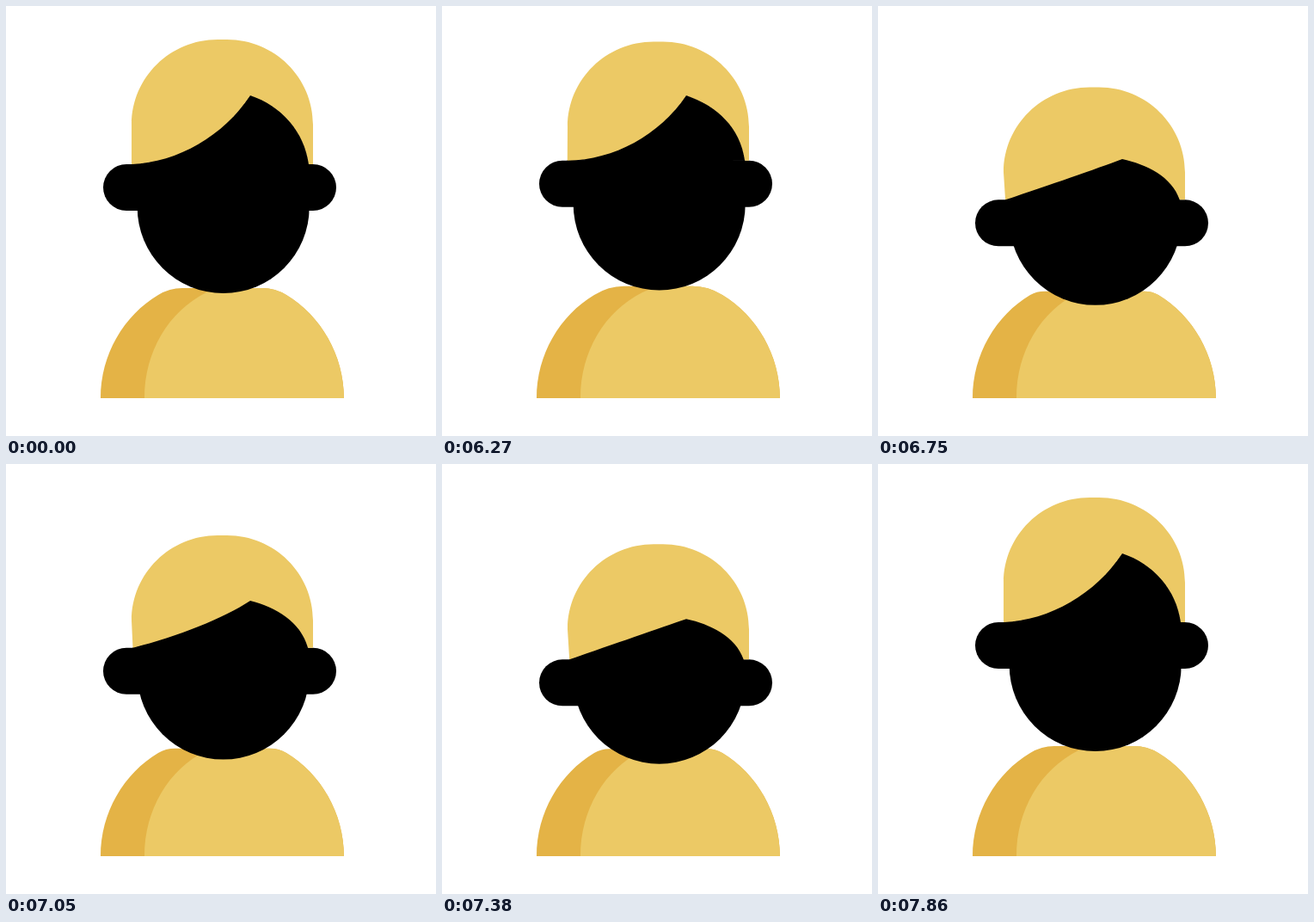
Animation, 500 px wide and 500 px high, one loop 7.89 s. Source, as an HTML page:

```html
<!DOCTYPE html>
<html lang="en">
<head>
<meta charset="utf-8">
<title>Nodding person</title>
<style>
  html, body { margin: 0; width: 100%; height: 100%; overflow: hidden; background: #fff; }
  svg { display: block; width: 100%; height: 100%; }
</style>
</head>
<body>
<svg viewBox="0 0 500 500">
  <path id="body" fill="#e4b346"/>
  <path id="bodyLight" fill="#ecc965"/>
  <circle id="face" cx="252.7" r="100"/>
  <rect id="ears" x="113" width="271" height="54" rx="27"/>
  <path id="forehead" stroke="#000"/>
  <path id="hair" fill="#ecc965"/>
</svg>
<script>
const LOOP = 7890, STEP = 30;
const $ = id => document.getElementById(id);
const draw = (id, d) => $(id).setAttribute('d', d);

// rest, raise, nod, half up, nod, overshoot, rest
const times = [6000, 6180, 6640, 6910, 7255, 7680, 7860];
const poses = {
  top:    [0, -5, 70.5, 29, 70.5, -7, 0],
  peak:   [0, -11, 98.7, 30.5, 98.7, -9, 0],
  ear:    [0, -11, 56.6, 14.6, 56.6, -7, 0],
  chin:   [0, -6, 19.4, 4, 19.4, -3, 0],
  collar: [0, -3, 5, 1.5, 5, -3, 0]
};

const easeOut = p => Math.sin(p * Math.PI / 2);
const easeIn = p => 1 - Math.cos(p * Math.PI / 2);
const smooth = p => p * p * (3 - 2 * p);

function poseAt(t) {
  const last = times.length - 2;
  let i = 0;
  while (i < last && t >= times[i + 1]) i++;
  const p = Math.min(1, Math.max(0, (t - times[i]) / (times[i + 1] - times[i])));
  const e = (i === 0 ? easeOut : i === last ? easeIn : smooth)(p);
  const pose = {};
  for (const key in poses) {
    const v = poses[key];
    pose[key] = v[i] + (v[i + 1] - v[i]) * e;
  }
  return pose;
}

function render(t) {
  const { top, peak, ear, chin, collar } = poseAt(t);

  // Shoulders
  const y = 328 + collar, bend = 190 - collar * 1.6, flat = 205 - collar * 3;
  const right = `H${503 - flat}Q${503 - bend} ${y} 326 336C366 360 393 406 393 456Z`;
  draw('body', `M110 456C110 405 137 360 177 336Q${bend} ${y} ${flat} ${y}${right}`);
  draw('bodyLight', `M161 456C161 402 189 355 233 333L250 ${y}${right}`);

  // Head
  $('face').setAttribute('cy', 234 + chin);
  $('ears').setAttribute('y', 184 + ear);

  // Hairline: the fringe flattens as the head tips forward
  const side = 184 + ear, tip = 104 + peak, k = peak / 74;
  const left = 146 + ear * 0.05, end = 352 - ear * 0.03;
  const bulge = 29 * (1 - peak / 76);
  const chord = x => side + (tip - side) * (x - left) / (284 - left) + bulge;
  const hairline = `M${left} ${side}C200 ${chord(200)} 253 ${chord(253)} 284 ${tip}` +
    `C${320 - 8 * k} ${tip + 12 - 6 * k} ${end - 5 - 4 * k} ${side - 38 + 11 * k} ${end} ${side}`;
  const crown = 39 + top, temple = 138 + top;
  draw('forehead', hairline + 'Z');
  draw('hair', `${hairline}H357V${temple}C357 ${temple - 55} 312 ${crown} 257 ${crown}` +
    `H246C191 ${crown} 146 ${temple - 55} 146 ${temple}Z`);
}

function tick() {
  const t = performance.now() % LOOP;
  render(Math.floor(t / STEP) * STEP);
  requestAnimationFrame(tick);
}
tick();
</script>
</body>
</html>
```
